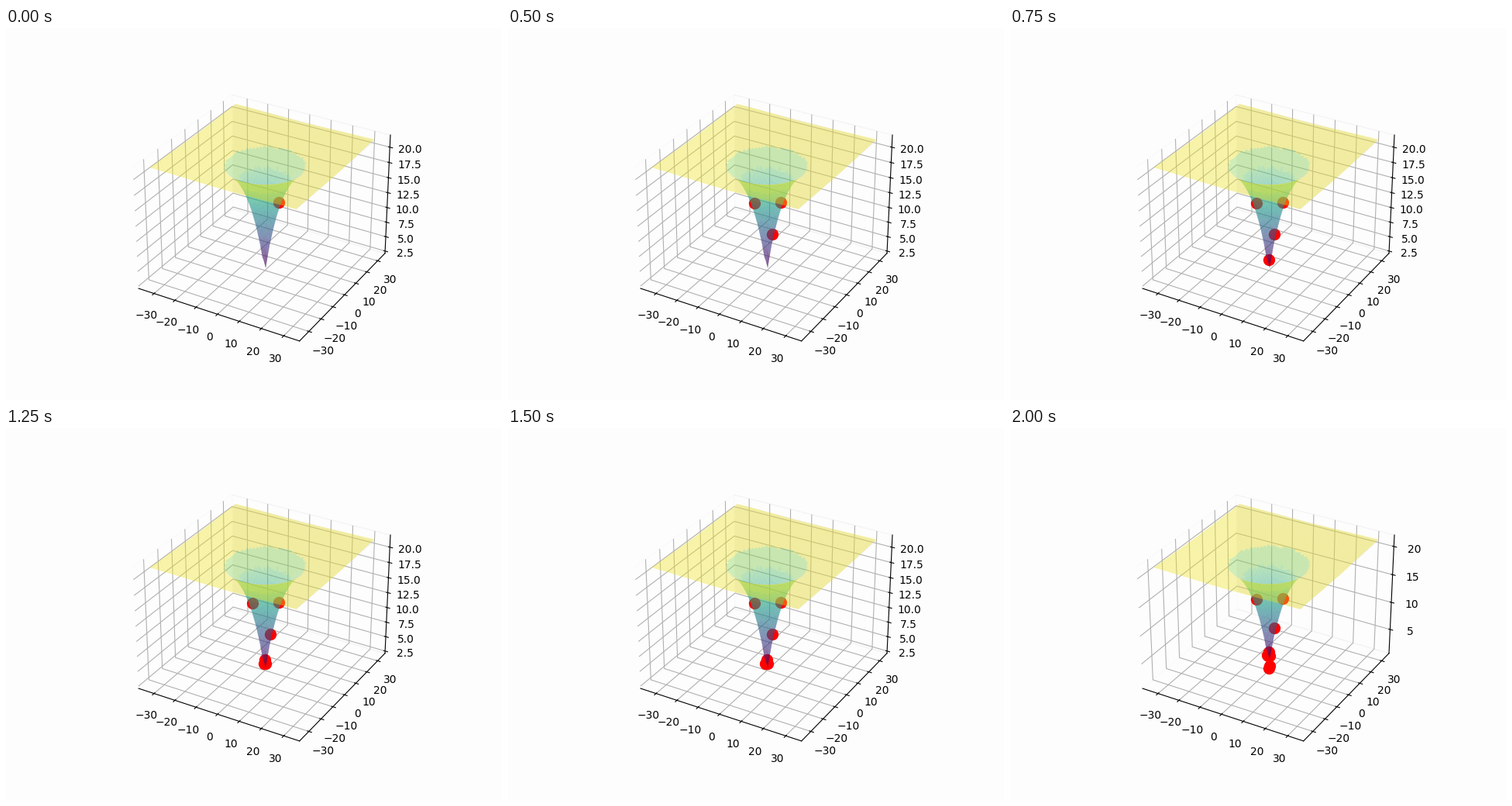
Recreate the animation shown at these times as a matplotlib script. Size 640 by 480 pixels, loop 2250 ms.

```python
import numpy as np
import matplotlib.pyplot as plt
from matplotlib.animation import FuncAnimation
from matplotlib.colors import ListedColormap
from matplotlib.patches import Polygon

W, H = 640, 480
STEPS = 9
BACKGROUND = "#fdfdfd"

# Search path: x, y and height of each visited position
PATH = [
    (3.84, 4.50, 13.20), (-2.60, -5.50, 14.20), (1.48, 2.07, 8.15),
    (0.53, -0.70, 4.20), (-0.17, -0.75, 3.44), (0.40, -0.35, 3.42),
    (-0.37, -0.67, 3.42), (0.15, 0.10, 1.30), (0.10, -0.05, 0.95),
]


def ackley(x, y):
    radius = np.sqrt((x**2 + y**2) / 2)
    waves = (np.cos(2 * np.pi * x) + np.cos(2 * np.pi * y)) / 2
    return 20 - 20 * np.exp(-0.2 * radius) + np.e - np.exp(waves)


def padded(low, high, margin=0.0):
    pad = (high - low) * margin
    low, high = low - pad, high + pad
    edge = (high - low) / 48
    return low - edge, high + edge


def banded_viridis():
    """Viridis with flat bands at its upper end."""
    level = np.linspace(0, 1, 256)
    level = np.where(level > 0.89, 0.98, np.where(level > 0.76, 0.82, level))
    return ListedColormap(plt.get_cmap("viridis")(level))


fig = plt.figure(figsize=(W / 100, H / 100), dpi=100, facecolor=BACKGROUND)
ax = fig.add_subplot(projection="3d")
ax.patch.set_visible(False)

for axis, edge in ((ax.xaxis, "#f8f8f8"), (ax.yaxis, "#ececec"),
                   (ax.zaxis, "#f4f4f4")):
    axis.pane.set_fill(False)
    axis.pane.set_edgecolor(edge)

# Back wall seen through the plateau
wall = np.array([(292.5, 100), (295, 98), (476, 145), (375, 234), (292.5, 211)])
fig.add_artist(Polygon(np.column_stack((wall[:, 0] / W, 1 - wall[:, 1] / H)),
                       transform=fig.transFigure, facecolor="#f2f2f2",
                       edgecolor="none", zorder=-1))

side = np.arange(-32.768, 32.768, 1.0)
X, Y = np.meshgrid(side, side)
Z = ackley(X, Y)
ax.plot_surface(X, Y, Z, rstride=1, cstride=1, cmap=banded_viridis(), alpha=0.4)
balls = [ax.scatter(*point, c="red", s=100, depthshade=False) for point in PATH]

ticks = np.arange(-30, 31, 10)
ax.set_xticks(ticks)
ax.set_yticks(ticks)
ax.set_xlim(*padded(side[0], side[-1], 0.05))
ax.set_ylim(*padded(side[0], side[-1], 0.05))


def update(step):
    for i, ball in enumerate(balls):
        ball.set_visible(i <= step)
    bottom = min([Z.min()] + [z for _, _, z in PATH[:step + 1]])
    spacing = 2.5 if bottom == Z.min() else 5
    ax.set_zticks(np.arange(spacing, 20.1, spacing))
    ax.set_zlim(*padded(bottom, Z.max()))
    return balls


anim = FuncAnimation(fig, update, frames=STEPS, interval=250, repeat=True,
                     init_func=lambda: update(0), blit=False)
plt.show()
```
